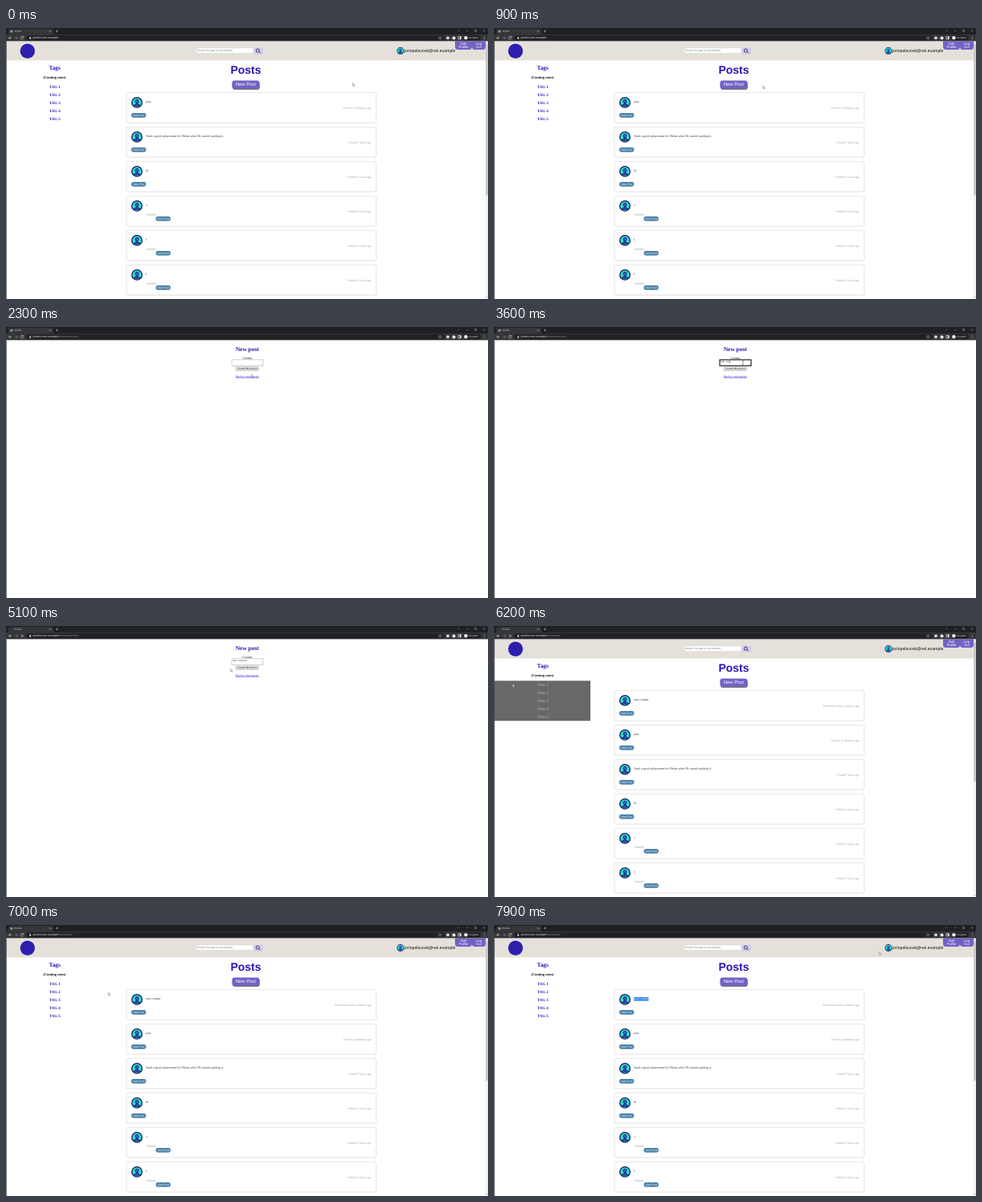
These frames come from a looping animation (600 by 338 pixels, 8000 ms). An HTML page:

```html
<!DOCTYPE html>
<html lang="en">
<head>
<meta charset="utf-8">
<title>Posts demo</title>
<style>
  html, body { margin: 0; width: 100%; height: 100%; overflow: hidden; background: #fff; }
  svg { display: block; width: 100vw; height: 100vh; }
  text { text-rendering: geometricPrecision; white-space: pre; }
  .sans { font-family: "Liberation Sans", Arial, sans-serif; }
  .serif { font-family: "Liberation Serif", "Times New Roman", serif; }
  .mono { font-family: "Liberation Mono", "Courier New", monospace; }
</style>
</head>
<body>
<svg id="stage" viewBox="0 0 600 338" preserveAspectRatio="none"></svg>
<script>
const LOOP = 8000;
const INK = '#2d12b4', PURPLE = '#7462c6', NAVY = '#17175e';

const attrs = o => Object.entries(o).map(([k, v]) => ` ${k}="${v}"`).join('');
const rect = (x, y, w, h, fill, o = {}) =>
  `<rect x="${x}" y="${y}" width="${w}" height="${h}" fill="${fill}"${attrs(o)}/>`;
const circle = (x, y, r, fill, o = {}) =>
  `<circle cx="${x}" cy="${y}" r="${r}" fill="${fill}"${attrs(o)}/>`;
const line = (d, stroke, width = 0.6, o = {}) =>
  `<path d="${d}" fill="none" stroke="${stroke}" stroke-width="${width}"${attrs(o)}/>`;
const text = (x, y, size, str, fill, font = 'sans', o = {}) =>
  `<text x="${x}" y="${y}" font-size="${size}" fill="${fill}" class="${font}"${attrs(o)}>${str}</text>`;
const group = (id, body, o = {}) => `<g id="${id}"${attrs(o)}>${body}</g>`;
const MID = { 'text-anchor': 'middle' }, END = { 'text-anchor': 'end' };
const BOLD_MID = { ...MID, 'font-weight': 700 };

function avatar(x, y, r) {
  return `<g transform="translate(${x} ${y}) scale(${r / 7})">` +
    circle(0, 0, 6.3, '#2fe3d0', { stroke: NAVY, 'stroke-width': 1.3 }) +
    `<path d="M-3.7 4.3C-3.6 .7 3.6 .7 3.7 4.3Z" fill="#2a45bd" stroke="${NAVY}" stroke-width=".7"/>` +
    circle(0, -1.4, 2.2, '#3560cf', { stroke: NAVY, 'stroke-width': 0.8 }) + '</g>';
}

function browser() {
  const grey = '#c4c7ca';
  return rect(0, 0, 600, 8.5, '#1f2023') +
    rect(3, 1, 56, 9, '#35363a', { rx: 1.6 }) +
    rect(0, 8, 600, 8.4, '#35363a') +
    rect(25, 9.2, 521, 6.2, '#202124', { rx: 3.1 }) +
    circle(6.8, 4.3, 1.5, '#9aa0a6', { id: 'favicon' }) +
    text(10.6, 5.2, 2.9, 'Plonkit', '#d5d7da') +
    line('M53.8 3.2l2 2m0-2l-2 2M63.5 2.4v3.2M61.9 4h3.2', grey, 0.5) +
    line('M562.5 3l1 1 1-1M573 3.6h2.2M583.4 2.3h2.2v2.2h-2.2ZM594 2.3l2.2 2.2m0-2.2L594 4.5', grey, 0.4) +
    line('M7 12.3H3.6m1.6-1.7L3.5 12.3l1.7 1.7', '#e0e2e5') +
    line('M11 12.3h3.4m-1.6-1.7l1.7 1.7-1.7 1.7', '#85888c') +
    group('reload', line('M21.5 11.3a1.8 1.8 0 1 0 .2 1.5M21.8 10.2v1.5h-1.5', '#e0e2e5', 0.55)) +
    group('stop', line('M18.8 10.8l3 3m0-3l-3 3', '#e0e2e5', 0.6)) +
    rect(29, 11.9, 2.2, 1.8, grey) + line('M29.5 12v-.8a.6.6 0 0 1 1.2 0v.8', grey, 0.4) +
    `<text x="33.6" y="13.4" font-size="3.45" class="sans" fill="#eceef0">plonkit.vero.example<tspan id="path" fill="#8f9499"></tspan></text>` +
    `<path d="M540.3 10.3l.6 1.3 1.4.1-1.1 1 .4 1.4-1.3-.8-1.3.8.4-1.4-1.1-1 1.4-.1Z" fill="none" stroke="${grey}" stroke-width=".4"/>` +
    circle(550, 12.3, 1.9, '#d6d8da') +
    `<path d="M555.7 11h1a.7.7 0 0 1 1.4 0h1v1a.7.7 0 0 1 0 1.4v.8h-3.4Z" fill="#e8eaed"/>` +
    rect(562.8, 10.7, 3.4, 3.2, 'none', { stroke: '#e8eaed', 'stroke-width': 0.6 }) +
    rect(564.7, 10.7, 1.5, 3.2, '#e8eaed') +
    rect(569, 9.2, 22, 6.2, '#202124', { rx: 3.1 }) +
    circle(572.4, 12.3, 2.3, '#e8eaed') +
    text(576.2, 13.4, 2.9, 'Incognito', '#e8eaed') +
    [10.7, 12.3, 13.9].map(y => circle(595.5, y, 0.45, '#e8eaed')).join('');
}

function pageHeader() {
  const corner = (x, w, a, b) =>
    `<path d="M${x} 16.4h${w}v7.2q0 3.4-3.4 3.4h${6.8 - w}q-3.4 0-3.4-3.4Z" fill="${PURPLE}"/>` +
    text(x + w / 2, 20.9, 4.1, a, '#fff', 'sans', MID) + text(x + w / 2, 25.3, 4.1, b, '#fff', 'sans', MID);
  return rect(0, 16.4, 600, 24, '#e5e1da') +
    circle(26.8, 28.8, 9.2, '#2d1fae') +
    rect(237, 25, 71, 6.4, '#fff', { rx: 0.8, stroke: '#cfcbd0', 'stroke-width': 0.4 }) +
    text(237.8, 29.3, 3.35, 'Search for tags or usernames', '#777') +
    rect(308, 24.8, 12, 7.6, '#d3cbe9', { rx: 1.2 }) +
    circle(313.3, 28, 2, 'none', { stroke: NAVY, 'stroke-width': 0.8 }) +
    line('M314.8 29.5l1.9 1.9', NAVY, 0.9) +
    avatar(491, 28.5, 4.5) +
    text(495.8, 30.3, 5.2, 'jorinpelavosk@nel.example', '#111') +
    corner(559, 21, 'Edit', 'Profile') + corner(580, 17, 'Log', 'Out');
}

function sidebar() {
  const tags = [1, 2, 3, 4, 5].map(n =>
    text(60.7, 64.7 + n * 10, 4.9, 'TAG ' + n, 'currentColor', 'serif', BOLD_MID)).join('');
  return text(60.7, 52, 7.4, 'Tags', INK, 'serif', BOLD_MID) +
    text(60.3, 62.9, 4.5, '(Coming soon)', '#111', 'serif', BOLD_MID) +
    group('tagBand', rect(0, 68.3, 120, 50, '#686868')) + group('tags', tags);
}

function card(post, i) {
  const y = 80.6 + i * 43, bx = post.note ? 186.5 : 156;
  return rect(149.2, y - 0.7, 312.4, 39, '#f1f1f2', { rx: 2.8 }) +
    rect(150.1, y, 310.6, 37.3, '#fff', { rx: 2, stroke: '#dfdfe2', 'stroke-width': 0.6 }) +
    avatar(163, y + 12.3, 7) +
    (post.fresh ? rect(174.2, y + 9.4, 0, 4.6, '#2f86e6', { id: 'mark' }) : '') +
    text(174.2, y + 12.8, 3.75, post.body, '#222', 'serif', post.fresh ? { id: 'freshBody' } : {}) +
    (post.note ? text(174.2, y + 24.8, 4, post.note, '#999', 'serif') : '') +
    text(454.6, y + 20.7, 3.8, `Posted ${post.age} ago`, '#9a9a9a', 'serif', END) +
    rect(bx, y + 25.3, 18.3, 5.8, '#4b82a8', { rx: 2.4 }) +
    text(bx + 9.15, y + 29.4, 3.3, 'View Post', '#fff', 'sans', MID);
}

const posts = [
  { body: 'new content', age: 'less than a minute', fresh: true },
  { body: 'post', age: '14 minutes' },
  { body: 'Need a good replacement for Plintor after FIL started spoiling it.', age: '7 days' },
  { body: 'hi', age: '11 days' },
  ...['s', 'f', 'f'].map(body => ({ body, age: '11 days', note: '+details' }))
];

function feed() {
  return rect(0, 16, 600, 322, '#fff') + pageHeader() + sidebar() +
    text(298.5, 57.1, 14, 'Posts', INK, 'sans', BOLD_MID) +
    rect(281.9, 67, 34, 10, '#77757f', { rx: 3.2 }) +
    rect(281.4, 65.4, 34, 10, PURPLE, { rx: 3.2, id: 'newButton' }) +
    text(298.4, 72.3, 5.85, 'New Post', '#fff', 'sans', MID) +
    group('before', posts.slice(1).map(card).join('')) +
    group('after', posts.map(card).join('')) +
    rect(597, 16.4, 3, 322, '#f1f1f1') + rect(597.3, 20, 2.4, 188.5, '#c1c1c1', { id: 'thumb' }) +
    line('M597.7 18.6l.8-.9.8.9M597.7 335.4l.8.9.8-.9', '#666', 0.5);
}

function form() {
  return rect(0, 16, 600, 322, '#fff') +
    text(300.3, 29.6, 7.45, 'New post', INK, 'serif', BOLD_MID) +
    text(300.4, 39.5, 3.8, 'Content', '#111', 'serif', MID) +
    rect(281, 40.9, 39, 7.4, '#fff', { id: 'field' }) +
    line('M317.8 47.8l1.6-1.6M318.8 47.8l.6-.6', '#777', 0.3) +
    text(282, 44.2, 2.75, '', '#111', 'mono', { id: 'typed' }) +
    rect(0, 41.8, 0.4, 3.2, '#111', { id: 'caret' }) +
    rect(286, 50, 28.4, 4.4, '#efefef', { rx: 0.6, stroke: '#777', 'stroke-width': 0.4 }) +
    text(300.2, 53.4, 3.25, 'Create Micropost', '#111', 'sans', MID) +
    text(300.4, 62.5, 3.75, 'Back to microposts', '#1d0be0', 'serif', { ...MID, 'text-decoration': 'underline' });
}

const pointers =
  group('arrow', '<path d="M0 0V3.7L.9 3 1.5 4.3 2.1 4 1.5 2.7 2.6 2.6Z" fill="#fff" stroke="#444" stroke-width=".35"/>') +
  group('hand', '<path d="M0 0q.7-.4 .9 .3V2l2 .5q.5 .2 .3 1L2.8 5H.3L-1.2 3q0-.8 .9-.2Z" fill="#fff" stroke="#222" stroke-width=".4"/>') +
  group('beam', line('M-.9-2.2Q0-2.2 0-1.5 0-2.2 .9-2.2M0-1.5V1.7M-.9 2.3Q0 2.3 0 1.7 0 2.3 .9 2.3', '#222', 0.5));

const stage = document.getElementById('stage');
stage.innerHTML = group('feed', feed()) + group('form', form()) +
  rect(0, 16.4, 0.7, 322, '#45464a') + browser() + group('pointer', pointers);

const el = {};
stage.querySelectorAll('[id]').forEach(n => { el[n.id] = n; });
const show = (id, on) => { el[id].style.display = on ? '' : 'none'; };
const set = (id, o) => { for (const k in o) el[id].setAttribute(k, o[k]); };

// Pointer stops: time, x, y
const route = [
  [100, 431.6, 68.6], [1300, 301, 73], [2000, 301, 73], [2600, 309.8, 44.6],
  [4500, 309.8, 44.6], [4800, 300, 52], [4950, 300, 52], [5100, 279.6, 53.4],
  [5450, 172, 62], [5900, 23.2, 72.4], [6450, 23.2, 72.4], [7000, 127.2, 83.8],
  [7200, 174.4, 92], [7300, 174.4, 92], [7500, 192.6, 92], [7600, 192.6, 92], [7900, 479.4, 33.4]
];

function pointerAt(t) {
  const n = route.findIndex(p => p[0] > t);
  if (n === 0) return route[0].slice(1);
  if (n < 0) return route[route.length - 1].slice(1);
  const [t0, x0, y0] = route[n - 1], [t1, x1, y1] = route[n];
  const u = (t - t0) / (t1 - t0), e = u * u * (3 - 2 * u);
  return [x0 + (x1 - x0) * e, y0 + (y1 - y0) * e];
}

const within = (v, a, b) => v >= a && v < b;
const FORM_AT = 2300, POSTED_AT = 6200, SUBMIT_AT = 4930;
const TYPE_AT = 2850, KEY_GAP = 105, MESSAGE = 'new content';

function render(t) {
  const [x, y] = pointerAt(t);
  const onForm = within(t, FORM_AT, POSTED_AT), posted = t >= POSTED_AT;
  const loading = within(t, 1750, FORM_AT) || within(t, SUBMIT_AT, POSTED_AT + 100);

  show('feed', !onForm);
  show('form', onForm);
  show('before', !posted);
  show('after', posted);
  show('reload', !loading);
  show('favicon', !loading);
  show('stop', loading);
  set('thumb', { height: posted ? 174 : 188.5 });
  el.path.textContent = onForm ? '/microposts/new' : posted ? '/microposts' : '';

  const overButton = !onForm && within(x, 281, 316) && within(y, 65, 77);
  const overTags = posted && x < 120 && within(y, 68, 118);
  set('newButton', { fill: overButton ? '#c9c1e5' : PURPLE });
  show('tagBand', overTags);
  el.tags.style.color = overTags ? '#aaa4cc' : INK;

  const count = Math.max(0, Math.min(MESSAGE.length, Math.floor((t - TYPE_AT) / KEY_GAP)));
  const focused = within(t, 2650, SUBMIT_AT - 30);
  const lastKey = TYPE_AT + count * KEY_GAP;
  el.typed.textContent = MESSAGE.slice(0, count);
  set('field', { stroke: focused ? '#111' : '#888', 'stroke-width': focused ? 1.1 : 0.4 });
  set('caret', { x: 282.1 + count * 1.65 });
  show('caret', focused && Math.floor(Math.max(0, t - lastKey) / 530) % 2 === 0);

  const picked = t < 7300 ? 0 : Math.min(18.2, Math.max(0, x - 174.2));
  set('mark', { width: picked });
  set('freshBody', { fill: picked > 9 ? '#fff' : '#222' });

  const overText = (onForm && within(x, 281, 320) && within(y, 41, 48.3)) ||
    (posted && within(x, 174, 193) && within(y, 90, 95));
  const overLink = overButton || overTags && within(x, 53, 69);
  show('beam', overText);
  show('hand', overLink && !overText);
  show('arrow', !overText && !overLink);
  set('pointer', { transform: `translate(${x} ${y})` });
}

const start = performance.now();
function tick() {
  render((performance.now() - start) % LOOP);
  requestAnimationFrame(tick);
}
tick();
</script>
</body>
</html>
```
